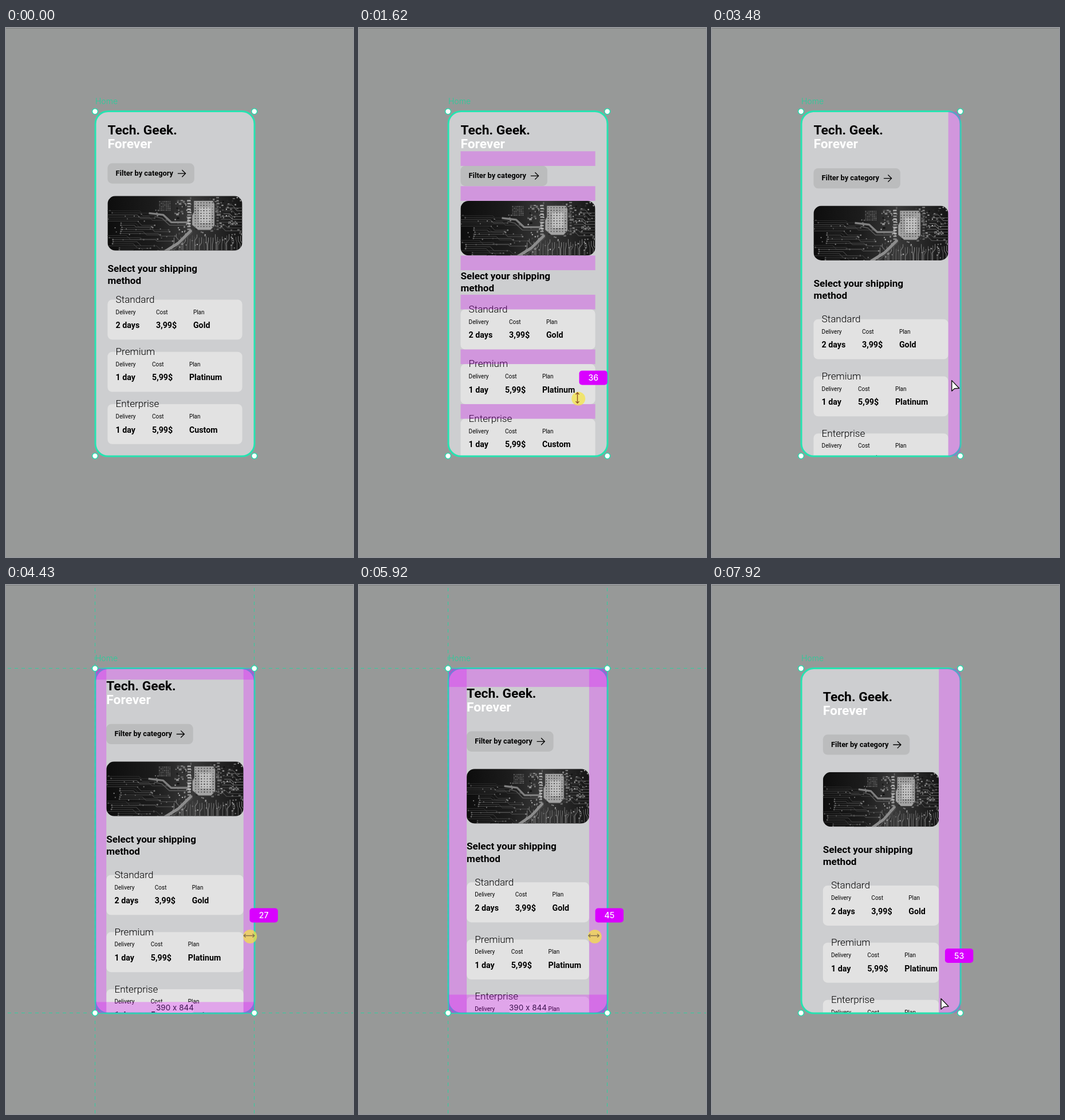
Write an HTML page that moves like this. It is 606 by 924 pixels and loops after 7.99 s.

```html
<!DOCTYPE html>
<html lang="en">
<head>
<meta charset="utf-8">
<title>Adjusting gap and padding</title>
<style>
html, body { margin: 0; width: 100%; height: 100%; overflow: hidden; background: #979998; }
svg { display: block; width: 606px; height: 924px; }
text { font-family: Roboto, sans-serif; white-space: pre; }
.ui { font-family: Inter, sans-serif; }
</style>
</head>
<body>
<svg id="stage" viewBox="0 0 606 924"></svg>
<script>
const LOOP = 7990, K = 278 / 390;
const F = { x: 156, y: 146, w: 278, h: 601.6 };
const RIGHT = F.x + F.w, BOTTOM = F.y + F.h;
const GREEN = '#25e3b0', PINK = '#d900ff';
const stage = document.getElementById('stage');

function set(node, attrs) {
  for (const k in attrs) node.setAttribute(k, attrs[k]);
  return node;
}
function el(tag, attrs, parent, text) {
  const node = set(document.createElementNS('http://www.w3.org/2000/svg', tag), attrs);
  if (text) node.textContent = text;
  (parent || stage).appendChild(node);
  return node;
}
const group = (parent, attrs) => el('g', attrs || {}, parent);
const rect = (parent, x, y, width, height, attrs) => el('rect', { x, y, width, height, ...attrs }, parent);
const path = (parent, d, attrs) => el('path', { d, fill: 'none', ...attrs }, parent);
const label = (parent, x, y, text, size, weight, attrs) =>
  el('text', { x, y, 'font-size': size, 'font-weight': weight, ...attrs }, parent, text);
const show = (node, on) => set(node, { visibility: on ? 'visible' : 'hidden' });
const move = (node, x, y) => set(node, { transform: `translate(${x} ${y})` });

function track(t, keys) {
  if (t <= keys[0][0]) return keys[0][1];
  for (let i = 1; i < keys.length; i++) {
    const [t0, v0] = keys[i - 1], [t1, v1] = keys[i];
    if (t <= t1) return v0 + (v1 - v0) * (t - t0) / (t1 - t0);
  }
  return keys[keys.length - 1][1];
}

// Artboard and its content
const defs = el('defs', {});
rect(el('clipPath', { id: 'board' }, defs), F.x, F.y, F.w, F.h, { rx: 21 });
const photoClip = rect(el('clipPath', { id: 'photo' }, defs), 0, 0, 235, 95.5, { rx: 14 });
const shade = el('linearGradient', { id: 'shade' }, defs);
[['0', '#0d0d0d'], ['.35', '#1c1c1c'], ['.62', '#393939'], ['1', '#141414']]
  .forEach(([offset, color]) => el('stop', { offset, 'stop-color': color }, shade));

rect(stage, 0, 0, 606, 924, { fill: '#979998' });
rect(stage, 0, 0, 606, 1, { fill: '#7f8180' });
label(stage, 156, 133, 'Home', 14, 300, { class: 'ui', fill: '#24cf9b' });
rect(stage, F.x, F.y, F.w, F.h, { rx: 21, fill: '#cdced0' });
const board = group(stage, { 'clip-path': 'url(#board)' });

const title = group(board);
label(title, 0, 18.8, 'Tech. Geek.', 22.8, 700);
label(title, 0, 42.8, 'Forever', 22.8, 700, { fill: '#fff' });

const button = group(board);
rect(button, 0, -.3, 151.5, 35.3, { rx: 8, fill: '#bbbcbd' });
label(button, 14.2, 21, 'Filter by category', 12.83, 600);
path(button, 'M122.5 17.4H136M130 11.3L136.2 17.4L130 23.5', { stroke: '#000', 'stroke-width': 1.3 });

const photo = group(board, { 'clip-path': 'url(#photo)' });
const picture = group(photo);

const heading = group(board);
label(heading, 0, 15.8, 'Select your shipping', 17.1, 700);
label(heading, 0, 37.2, 'method', 17.1, 700);

const cards = [
  ['Standard', '2 days', '3,99$', 'Gold', 84.6, 149.5],
  ['Premium', '1 day', '5,99$', 'Platinum', 77.6, 142.5],
  ['Enterprise', '1 day', '5,99$', 'Custom', 77.6, 142.5]
].map(([name, days, cost, plan, x2, x3]) => {
  const node = group(board);
  const box = rect(node, 0, 0, 235, 69.87, { rx: 8, fill: '#e2e2e2' });
  label(node, 14.2, 5.4, name, 17.1, 300);
  [['Delivery', days, 14.2], ['Cost', cost, x2], ['Plan', plan, x3]].forEach(([head, value, x]) => {
    label(node, x, 25.1, head, 10, 400);
    label(node, x, 49.8, value, 14.26, 700);
  });
  return { node, box };
});

// Circuit board picture, drawn 235 units wide
(function drawPicture() {
  let seed = 11;
  const rnd = (a, b) => {
    seed = (seed * 16807) % 2147483647;
    return a + (b - a) * seed / 2147483647;
  };
  const grey = v => `rgb(${v | 0},${v | 0},${v | 0})`;
  const line = (d, v, w) => path(picture, d, { stroke: grey(v), 'stroke-width': w, 'stroke-linejoin': 'round' });
  const dot = (cx, cy, r, v) => el('circle', { cx, cy, r, fill: grey(v) }, picture);
  rect(picture, 0, 0, 235, 95.5, { fill: 'url(#shade)' });
  for (let i = 0; i < 20; i++) {
    const y = 26 + i * 3.6, x = rnd(-10, 25), end = rnd(60, 118), bend = rnd(2, 8);
    line(`M${x} ${y}H${end - 30}l${bend} ${bend}H${end}`, rnd(45, 85), 1);
    dot(x, y, 1.4, rnd(70, 110));
    dot(end, y + bend, 1.4, rnd(80, 150));
  }
  for (let i = 0; i < 26; i++) dot(rnd(4, 112), rnd(24, 92), 1.1, rnd(80, 130));
  for (let r = 0; r < 6; r++)
    for (let c = 0; c < 7; c++) rect(picture, 90 + c * 3, 9 + r * 3, 1.8, 1.8, { fill: grey(rnd(65, 125)) });
  for (let i = 0; i < 30; i++) {
    const x = 116 + i * 4;
    line(`M${x} ${rnd(66, 76)}v${rnd(4, 10)}l${rnd(-5, 5)} 6V96`, rnd(70, 135), 1.1);
  }
  for (let i = 0; i < 130; i++) {
    const x = rnd(114, 233), y = rnd(1, 66);
    rect(picture, x, y, rnd(2, 5), rnd(1.5, 4), { fill: grey(rnd(10, 155)) });
  }
  for (let i = 0; i < 90; i++) dot(rnd(118, 233), rnd(2, 92), 1.2, rnd(95, 185));
  for (let i = 0; i < 9; i++) line(`M${192 + i * 2} ${56 - i * 5}h${rnd(8, 16)}l5 5H236`, rnd(70, 115), 1);
  line('M72 30L97 33L111 46H141V38', 128, 3.4);
  line('M82 36L95 39L108 51H139', 92, 1.4);
  line('M100 97L124 82L146 60', 140, 5);
  line('M112 97L135 76L148 63', 75, 1.6);
  path(picture, 'M150 8H184L187 14V52L180 60H158L147 51V34L150 28Z', { fill: '#a3a3a3', stroke: '#3e3e3e', 'stroke-width': 1.5 });
  rect(picture, 160, 20, 20, 27, { rx: 2, fill: '#c2c2c2' });
  for (let r = 0; r < 10; r++)
    for (let c = 0; c < 7; c++) dot(153 + c * 5, 12 + r * 4.6, 1.1, rnd(45, 125));
  for (let r = 0; r < 11; r++) {
    rect(picture, 139, 7 + r * 5, 6, 2.6, { fill: grey(rnd(130, 190)) });
    rect(picture, 190, 7 + r * 5, 4, 2.6, { fill: grey(rnd(75, 140)) });
  }
})();

// Editor overlays
const band = parent => rect(parent, 0, 0, 0, 0, { fill: PINK, 'fill-opacity': .27 });
const gapLayer = group(board);
const gaps = Array.from({ length: 6 }, () => band(gapLayer));
rect(stage, F.x, F.y - .5, F.w, F.h + 1, { rx: 22, fill: 'none', stroke: GREEN, 'stroke-width': 3 });
const padRight = band();
const padRest = group();
const [padLeft, padTop, padBottom] = [0, 1, 2].map(() => band(padRest));

const dragLayer = group();
path(dragLayer, 'M155.5 5V924M433.5 5V924M3 145.5H606M3 747.5H606',
  { stroke: '#2fcf9f', 'stroke-width': 1, 'stroke-dasharray': '6 6' });
rect(dragLayer, F.x, F.y - .5, F.w, F.h + 1, { fill: 'none', stroke: '#2fcdb9', 'stroke-width': 1.6 });
rect(dragLayer, 262, 729, 66, 18, { rx: 3, fill: '#e6a9ef' });
label(dragLayer, 295, 742.5, '390 x 844', 13.5, 400, { class: 'ui', fill: '#3c1450', 'text-anchor': 'middle' });

for (const cx of [155.5, 433.7])
  for (const cy of [145.7, 747.5])
    el('circle', { cx, cy, r: 5, fill: '#fff', stroke: '#2bd8ab', 'stroke-width': 1.6 }, stage);

const badge = group();
rect(badge, -24.7, -12.5, 49.4, 25, { rx: 5, fill: PINK });
const badgeText = label(badge, 0, 5, '30', 14, 500, { class: 'ui', fill: '#fff', 'text-anchor': 'middle' });

const press = el('circle', { r: 12, fill: '#f6e53d', 'fill-opacity': .7 }, stage);
const arrow = path(stage, 'M0 0V18.5L5 14.2L13 13.6Z', { stroke: '#111', 'stroke-width': 1.4, 'stroke-linejoin': 'round' });
arrow.setAttribute('fill', '#fff');
const resize = group();
const resizeMark = path(resize, 'M0 -9V9M-3 -6L0 -9.3L3 -6M-3 6L0 9.3L3 6', { 'stroke-width': 1.3 });

const gapKeys = [[1430, 30], [1830, 42]];
const padKeys = [[4030, 30], [4430, 27], [4640, 25], [4850, 25], [4980, 23], [5180, 23], [5240, 25],
  [5510, 42], [5650, 42], [5920, 45], [6060, 49], [6340, 49], [6460, 53]];

function layout(gap, pad) {
  const x = F.x + pad * K, w = F.w - 2 * pad * K, g = gap * K;
  let y = F.y + pad * K, n = 0;
  const place = (node, h) => {
    move(node, x, y);
    y += h;
    if (n < 6) set(gaps[n++], { x, y, width: w, height: g });
    y += g;
  };
  place(title, 47.9);
  place(button, 35.3);
  place(photo, 95.5);
  place(heading, 42.8);
  cards.forEach(c => {
    place(c.node, 69.87);
    set(c.box, { width: w });
  });
  set(photoClip, { width: w });
  set(picture, { transform: `scale(${w / 235} 1)` });

  const p = pad * K;
  set(padLeft, { x: F.x, y: F.y, width: p, height: F.h });
  set(padRight, { x: RIGHT - p, y: F.y, width: p, height: F.h });
  set(padTop, { x: F.x, y: F.y, width: F.w, height: p });
  set(padBottom, { x: F.x, y: BOTTOM - p, width: F.w, height: p });
}

function pointer(t) {
  const mix = (t0, t1, a, b) => {
    const u = Math.min(1, Math.max(0, (t - t0) / (t1 - t0)));
    const e = 1 - (1 - u) * (1 - u);
    return [a[0] + (b[0] - a[0]) * e, a[1] + (b[1] - a[1]) * e];
  };
  if (t < 1400) return mix(70, 830, [562, 910], [382, 642]);
  if (t < 3020) return [381.5, 642 + (track(t, gapKeys) - 30) * K];
  if (t < 4000) return mix(2960, 3690, [381.5, 650.6], [422, 612.5]);
  if (t < 7780) return [422 - (track(t + 60, padKeys) - 30) * K, 612.5];
  return [track(t, [[7710, 405.6], [7920, 400]]), track(t, [[7710, 612.5], [7920, 722.5]])];
}

function draw(t) {
  const gap = Math.round(track(t, gapKeys)), pad = Math.round(track(t, padKeys));
  const [x, y] = pointer(t);
  layout(gap, pad);

  const gapPress = t >= 1290 && t < 3020, padPress = t >= 4090 && t < 7780;
  const onGap = t < 3020 && (t >= 830 || (x < 412 && y > 636 && y < 657));
  const onPad = t >= 70 && !onGap && x > RIGHT - pad * K && x < RIGHT && y < BOTTOM;
  show(gapLayer, onGap);
  show(padRight, onPad || t >= 3690);
  show(padRest, padPress);
  show(dragLayer, padPress);

  const gapSide = t < 3020;
  show(badge, (t >= 890 && gapSide) || t >= 3820);
  badgeText.textContent = gapSide ? gap : pad;
  if (gapSide) move(badge, 409.2, 606.7 + (gap - 30) * K);
  else move(badge, 448 - (pad - 30) * K, track(t, [[7780, 577], [7920, 647.5]]));

  const sizing = (t >= 830 && gapSide) || (t >= 3690 && t < 7850);
  const pressed = gapPress || padPress;
  show(press, pressed);
  move(press, x + 1.7, y + 1.5);
  show(arrow, t >= 70 && !sizing);
  move(arrow, x, y);
  show(resize, sizing);
  set(resize, { transform: `translate(${x} ${y})` + (gapSide ? '' : ' rotate(90)') });
  set(resizeMark, { stroke: !pressed ? '#222' : gapSide ? '#8a4a24' : '#85714f' });
}

const start = performance.now();
function tick(now) {
  draw(Math.max(0, now - start) % LOOP);
  requestAnimationFrame(tick);
}
draw(0);
requestAnimationFrame(tick);
</script>
</body>
</html>
```
